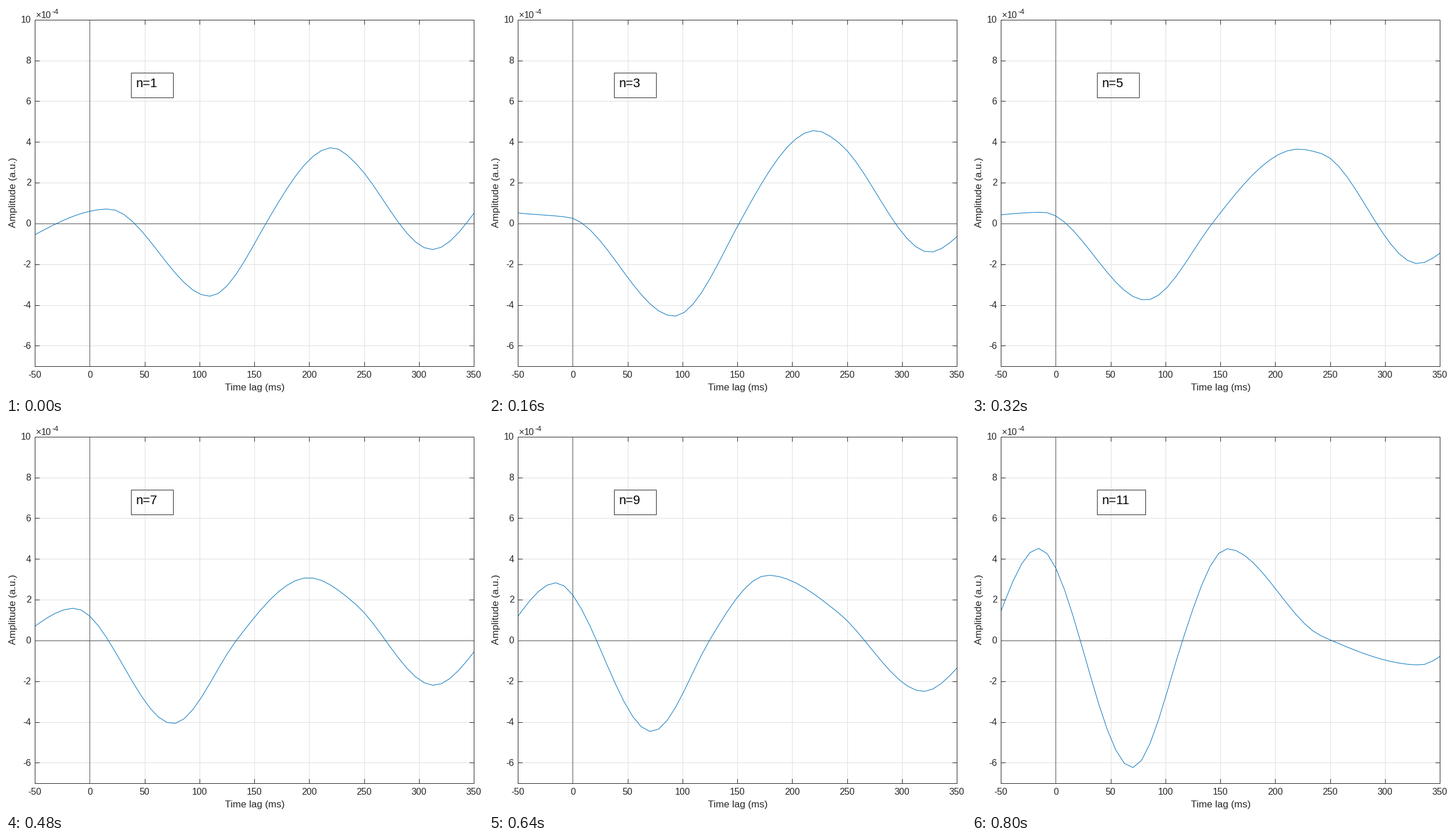
These frames come from a looping animation (828 px wide and 676 px high, 880 ms). A matplotlib script:

```python
import matplotlib.pyplot as plt
import numpy as np
from matplotlib.animation import FuncAnimation
from matplotlib.patches import Rectangle

W, H, DPI = 828, 676, 64
LEFT, RIGHT, TOP, BOTTOM = 50.2, 812.2, 23.8, 625.8
INK = "#262626"
PT = 72 / DPI  # points per pixel
COUNT = 11
SAMPLES = np.arange(-7, 46) * 7.8125  # ms

plt.rcParams["font.family"] = "Liberation Sans"


def smooth_curve(t, v, x):
    """Cubic through (t, v): flat at turning points, no overshoot on the flanks."""
    secant = np.diff(v) / np.diff(t)
    before, after = secant[:-1], secant[1:]
    gentle = np.sign(before) * np.minimum(abs(before), abs(after))
    inner = np.where(before * after > 0, 1.5 * gentle, 0)
    slope = np.concatenate([[1.5 * secant[0]], inner, [1.5 * secant[-1]]])

    k = np.clip(np.searchsorted(t, x, side="right") - 1, 0, len(t) - 2)
    h = t[k + 1] - t[k]
    s = (x - t[k]) / h
    ease = s * s * (3 - 2 * s)
    bend = s * (1 - s) * ((1 - s) * slope[k] - s * slope[k + 1])
    return v[k] + ease * (v[k + 1] - v[k]) + h * bend


def wave(n):
    """Amplitude (1e-4) over the samples: each feature drifts with n."""
    def level(*keys):
        return np.interp(n, range(1, 12, 2), keys)

    late_t = 322 - 10 * np.cos(2 * np.pi * (n - 1) / 6.6)
    late = level(-1.28, -1.41, -1.97, -2.2, -2.5, -1.2)
    end_t = 352
    points = [
        (-55, level(-.7, .55, .4, .5, .8, .7)),
        (-16 + 33 * np.exp((1 - n) / 2), level(.71, .3, .55, 1.58, 2.83, 4.52)),
        (66 + 43 * np.exp((1 - n) / 4), level(-3.57, -4.55, -3.76, -4.08, -4.47, -6.24)),
        (165 - 4.5 * n, 0),
        (221 - 10.8 * max(0, n - 5), level(3.72, 4.56, 3.65, 3.08, 3.2, 4.5)),
        (242, level(2.97, 3.98, 3.43, 1.79, 1.36, .22)),
        (late_t, late),
        (end_t, late + .0012 * (end_t - late_t)**2),
    ]
    t, v = np.array(points, float).T
    return smooth_curve(t, v, SAMPLES)


fig = plt.figure(figsize=(W / DPI, H / DPI), dpi=DPI, facecolor="white")
ax = fig.add_axes([LEFT / W, 1 - BOTTOM / H, (RIGHT - LEFT) / W, (BOTTOM - TOP) / H])
ax.set(xlim=(-50, 350), ylim=(-7, 10),
       xticks=range(-50, 351, 50), yticks=range(-6, 11, 2))
ax.set_axisbelow(True)
ax.grid(color="#dfdfdf", lw=PT)
ax.tick_params(direction="in", length=7.6 * PT, width=PT, color=INK,
               top=True, right=True, labelbottom=False, labelleft=False)
for spine in ax.spines.values():
    spine.set(color=INK, linewidth=PT)
ax.axvline(0, color="#505050", lw=PT)
ax.axhline(0, color="#505050", lw=PT)
curve, = ax.plot(SAMPLES, wave(1), color="#0072BD", lw=PT)

# Overlay in pixel coordinates, y pointing down
page = fig.add_axes([0, 0, 1, 1])
page.set(xlim=(0, W), ylim=(H, 0))
page.axis("off")


def write(x, y, text, size=16, ha="center", color=INK, **kw):
    return page.text(x, y, text, fontsize=size * PT, ha=ha, va="baseline",
                     color=color, **kw)


for t in range(-50, 351, 50):
    write(LEFT + (t + 50) * (RIGHT - LEFT) / 400, 646.5, str(t))
for a in range(-6, 11, 2):
    write(43.5, TOP + (10 - a) * (BOTTOM - TOP) / 17 + 5.4, str(a), ha="right")
write(51.5, 21, "×", ha="left")
write(61, 21, "10", ha="left")
write(79.3, 14, "-4", size=13.2, ha="left")
write(431.5, 668, "Time lag (ms)", size=17)
write(17.5, 324, "Amplitude (a.u.)", size=17.2, rotation=90, rotation_mode="anchor")

box = page.add_patch(Rectangle((217.2, 115.8), 73, 43, fill=False, ec=INK, lw=PT))
label = write(225.5, 141, "n=1", size=22, ha="left", color="black")


def draw(i):
    n = i + 1
    curve.set_ydata(wave(n))
    label.set_text(f"n={n}")
    box.set_width(73 if n < 10 else 84)
    return curve, label, box


anim = FuncAnimation(fig, draw, frames=COUNT, interval=80, repeat=True, repeat_delay=0)
plt.show()
```
